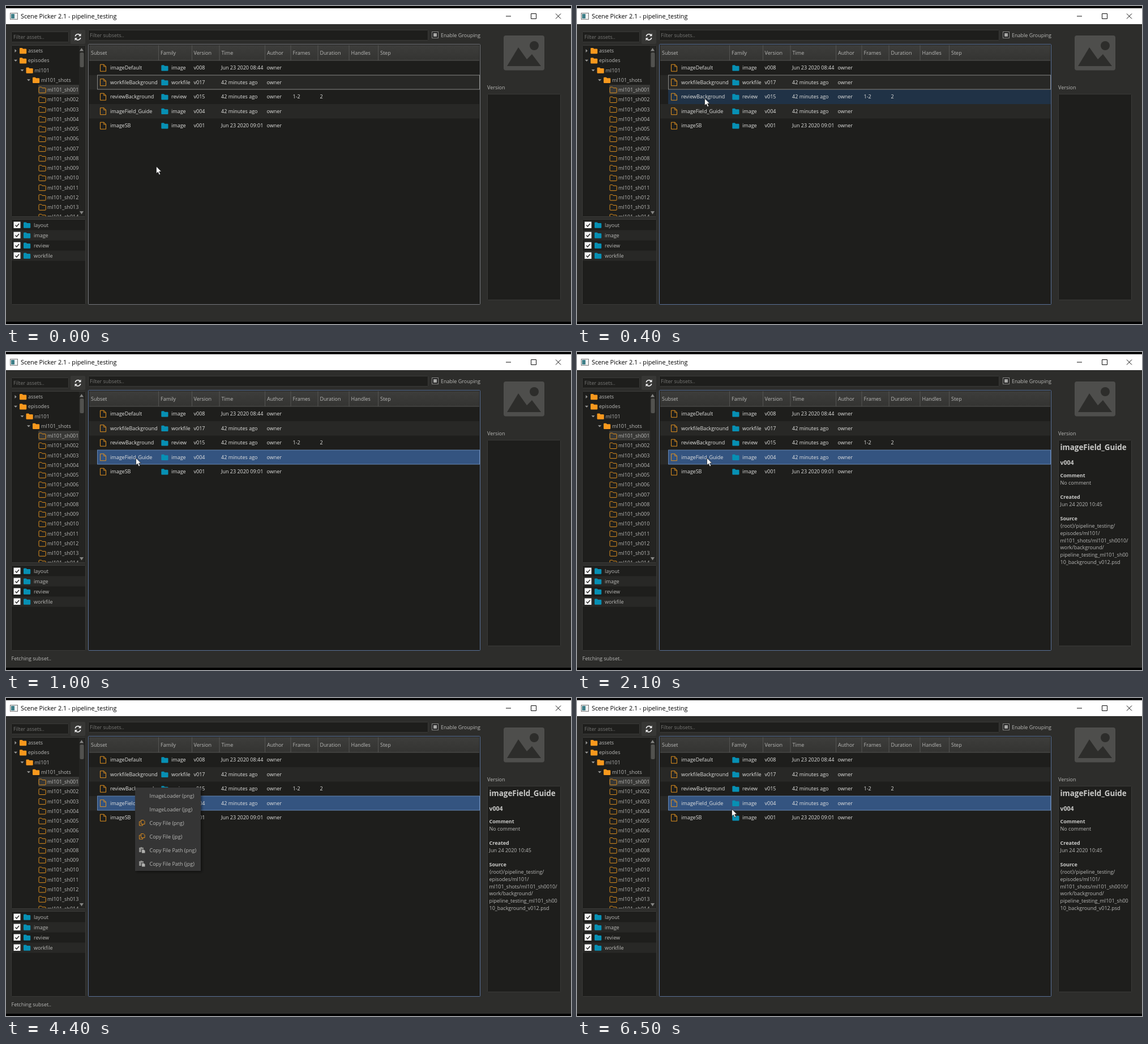
Write an HTML page that moves like this. It is 998 by 561 pixels and loops after 6800 ms.

```html
<!DOCTYPE html>
<html lang="en">
<head>
<meta charset="utf-8">
<title>Scene Picker</title>
<style>
  html, body { margin: 0; width: 100%; height: 100%; overflow: hidden; background: #000; }
  svg { display: block; width: 998px; height: 561px; }
  text { font: 9px "Open Sans", "Noto Sans", sans-serif; fill: #b9b9b7; white-space: pre; }
  .title { font-size: 10.8px; fill: #000; }
  .bright { fill: #e2e2e0; }
  .hint { fill: #777775; }
  .dark { fill: #1c1f22; }
  .bold { font-weight: 700; fill: #cbcbc9; }
  .panel { fill: #1e1e1c; stroke: #3a3a38; }
</style>
</head>
<body>
<svg id="stage" viewBox="0 0 998 561">
  <defs>
    <linearGradient id="head" x2="0" y2="1">
      <stop stop-color="#3d3d3b"/><stop offset="1" stop-color="#343432"/>
    </linearGradient>
    <filter id="shadow"><feDropShadow dx="2" dy="2" stdDeviation="2" flood-opacity=".5"/></filter>
    <clipPath id="treeClip"><rect x="10" y="69" width="119" height="302"/></clipPath>
    <path id="folder" d="M0 1.2Q0 0 1.2 0H4.6L6 1.6H11Q12.2 1.6 12.2 2.8V9Q12.2 10.2 11 10.2H1.2Q0 10.2 0 9Z"/>
    <path id="file" d="M.5.5H7L10.5 4V12.5H.5ZM6.8.7V4.2H10.3" fill="none" stroke="#e0901f"/>
    <g id="copy" fill="none" stroke="#d98a1e"><path d="M3.5 2.5V.5H8L10 2.5V7.5H3.5V2.5"/><path d="M3.5 3H.5V10H6.5V7.5"/></g>
    <g id="paste"><path d="M0 1H2.5V0H5.5V1H8V3.5H4V9H0Z" fill="#8f8f8d"/><path d="M5 4.5H8.5L10.5 6.5V10.5H5Z" fill="#b0b0ae"/></g>
  </defs>
  <g id="base"></g>
  <g id="rowMarks">
    <rect id="hover" x="161" width="675.5" height="25.5" fill="#203246"/>
    <rect id="current" x="161.5" y="122" width="675" height="25" fill="none" stroke="#858583"/>
    <rect id="selected" x="161.5" y="173" width="675" height="25" fill="#345480" stroke="#6585b2"/>
  </g>
  <g id="content"></g>
  <text id="status" x="9.5" y="543.7">Fetching subset..</text>
  <g id="details"></g>
  <g id="menu"></g>
  <path id="cursor" d="M0 0V12.6L2.9 9.9 5 14.8 7.2 13.8 5.1 9.1H9Z" fill="#fff" stroke="#111" stroke-width=".7"/>
</svg>
<script>
const $ = id => document.getElementById(id);
const text = (x, y, s, cls = "", size = "") =>
  `<text x="${x}" y="${y + 3.2}" class="${cls}" ${size && `style="font-size:${size}px"`}>${s}</text>`;
const rect = (x, y, w, h, attrs) => `<rect x="${x}" y="${y}" width="${w}" height="${h}" ${attrs}/>`;
const panel = (x, y, w, h) => rect(x + .5, y + .5, w - 1, h - 1, 'class="panel" rx="1"');
const path = (d, attrs) => `<path d="${d}" ${attrs}/>`;
const use = (id, x, y, attrs = "") => `<use href="#${id}" x="${x}" y="${y}" ${attrs}/>`;
const BLUE = 'fill="#0790b4"', ORANGE = 'fill="#f8981d"';
const OPEN = 'fill="none" stroke="#e0901f"';
const ROW_TOP = 96.5, ROW_H = 25.5;

function windowFrame() {
  return rect(0, 4, 998, 553, 'fill="#2d2d2b"') + rect(0, 4, 998, 28, 'fill="#fff"') +
    rect(7.5, 12.5, 13, 11, 'fill="#f2f2f2" stroke="#777"') + rect(9, 14, 6, 8, 'fill="#3f7f88"') +
    text(26, 18.4, "Scene Picker", "title") + text(92, 18.4, "2.1 - pipeline_testing", "title") +
    path("M883 18H892M927.5 13.5H936.5V22.5H927.5ZM971 13.5L980 22.5M980 13.5L971 22.5", 'fill="none" stroke="#111"');
}

function filters() {
  return panel(9, 45, 102, 19) + text(13, 55, "Filter assets..", "hint") +
    rect(114, 42, 26, 25, 'rx="2" fill="#373735"') +
    path("M122.3 53.5A5 5 0 0 1 131 51.4M131.7 56A5 5 0 0 1 123 58.1", 'fill="none" stroke="#f0f0f0" stroke-width="1.7"') +
    path("M132.5 48.5V53.2H127.8ZM121.5 61V56.3H126.2Z", 'fill="#f0f0f0"') +
    panel(145, 42, 601, 19) + text(148, 52, "Filter subsets..", "hint") +
    rect(752.5, 45.5, 11, 11, 'fill="#222" stroke="#858583"') + rect(755, 48, 6, 6, 'fill="#a8a8a6"') +
    text(768, 51.3, "Enable Grouping");
}

function tree() {
  const parents = ["assets", "episodes", "ml101", "ml101_shots"].map((name, i) => {
    const x = 17 + Math.max(0, i - 1) * 11.5, y = 79 + i * 17.25;
    const arrow = i ? `M${x - 3} ${y - 1.5}h6l-3 3.2z` : `M${x - 1.5} ${y - 3}v6l3.2-3z`;
    return path(arrow, 'fill="#999997"') + use("folder", x + 7, y - 5, ORANGE) + text(x + 22, y, name);
  });
  const shots = Array.from({ length: 14 }, (_, i) => {
    const y = 148 + i * 17.25;
    return use("folder", 58, y - 5, OPEN) + text(73, y, "ml101_sh" + String(i + 1).padStart(3, "0"));
  });
  return panel(9, 69, 132, 303) +
    `<g clip-path="url(#treeClip)">${rect(57, 139, 72, 17, 'fill="#383836"')}${parents.join("")}${shots.join("")}</g>` +
    rect(129, 70, 10, 301, 'fill="#242422"') + rect(130.5, 82, 7, 26, 'rx="2" fill="#52524f"') +
    path("M130 79.5H137L133.5 74ZM130 362H137L133.5 367.5Z", 'fill="#858583"');
}

function families() {
  return panel(9, 376, 132, 151) + ["layout", "image", "review", "workfile"].map((name, i) => {
    const y = 386.5 + i * 18;
    return (i % 2 ? rect(10, y - 9, 130, 18, 'fill="#282826"') : "") +
      rect(13.5, y - 6, 12, 11.5, 'fill="#f4f4f4"') +
      path(`M16.5 ${y}l2.3 2.5 4.2-5`, 'fill="none" stroke="#222" stroke-width="1.3"') +
      use("folder", 31, y - 5, BLUE) + text(49, y, name);
  }).join("");
}

function tableBase() {
  const heads = { Subset: 150, Family: 273, Version: 331.5, Time: 380.5, Author: 461, Frames: 506.5, Duration: 554.5, Handles: 609.5, Step: 661 };
  const splits = [269.5, 328.5, 377, 457.5, 503, 551, 606, 657.5].map(x => `M${x} 69V96`).join("");
  return rect(145.5, 67.5, 692, 459, 'id="table" rx="1" fill="#1e1e1c"') +
    rect(147, 69, 689, 27, 'fill="url(#head)"') + path(splits + "M147 96H836", 'stroke="#545452"') +
    Object.entries(heads).map(([name, x]) => text(x, 82.5, name)).join("") +
    [1, 3].map(i => rect(147, ROW_TOP + i * ROW_H, 689, ROW_H, 'fill="#282826"')).join("");
}

function tableRows() {
  const ago = "42 minutes ago";
  return [
    ["imageDefault", "image", "v008", "Jun 23 2020 08:44"],
    ["workfileBackground", "workfile", "v017", ago],
    ["reviewBackground", "review", "v015", ago, "1-2", "2"],
    ["imageField_Guide", "image", "v004", ago],
    ["imageSB", "image", "v001", "Jun 23 2020 09:01"]
  ].map(([name, family, version, time, frames = "", duration = ""], i) => {
    const y = 109.2 + i * ROW_H;
    const cells = [[184, name], [292, family], [331.5, version], [380, time], [460.5, "owner"], [506.5, frames], [554.5, duration]];
    return use("file", 166, y - 6.5) + use("folder", 274.3, y - 5, BLUE) +
      cells.map(([x, s]) => text(x, y, s, "bright")).join("");
  }).join("");
}

function versionPane() {
  return rect(879, 52, 72, 61.5, 'rx="4" fill="#4e4e4c"') +
    `<circle cx="933" cy="70" r="8" fill="#2d2d2b"/>` +
    path("M885 106L905 73L920 94L929 85L945 106Z", 'fill="#2d2d2b"') +
    text(850, 144, "Version") + panel(850, 155, 130, 364);
}

function details() {
  const lines = ["{root}/pipeline_testing/", "episodes/ml101/", "ml101_shots/ml101_sh0010/", "work/background/", "pipeline_testing_ml101_sh00", "10_background_v012.psd"];
  return text(853.5, 169.8, "imageField_Guide", "bold", 13.4) + text(853.5, 195.7, "v004", "bold", 10.5) +
    text(853.5, 217.5, "Comment", "bold") + text(853.5, 230.3, "No comment") +
    text(853.5, 255.8, "Created", "bold") + text(853.5, 268.5, "Jun 24 2020 10:45") +
    text(853.5, 294, "Source", "bold") +
    lines.map((s, i) => text(853.5, 307 + i * 12.7, s)).join("");
}

function menu() {
  const items = ["ImageLoader", "Copy File", "Copy File Path"].flatMap(s => [s + " (png)", s + " (jpg)"]);
  return rect(228, 158, 116, 147, 'fill="#363634" filter="url(#shadow)"') +
    items.map((s, i) => {
      const y = 172.5 + i * 24;
      return (i < 2 ? "" : use(i < 4 ? "copy" : "paste", 235, y - 5.5)) + text(253.5, y, s);
    }).join("") +
    `<g id="menuHover">${rect(234, 184, 107, 24, 'fill="#30475f"')}${text(253.5, 196.5, items[1], "dark")}</g>`;
}

$("base").innerHTML = windowFrame() + filters() + tree() + families() + tableBase();
$("content").innerHTML = tableRows() + versionPane();
$("details").innerHTML = details();
$("menu").innerHTML = menu();

const clamp = v => Math.min(1, Math.max(0, v));
const ease = v => v * v * (3 - 2 * v);
const mix = (a, b, p) => a + (b - a) * p;
const show = (id, on) => $(id).setAttribute("visibility", on ? "visible" : "hidden");

function pointer(t) {
  if (t >= 6500) return [273.5, 196];
  const reach = ease(clamp(t / 400)), nudge = clamp((t - 500) / 300);
  return [mix(mix(265.5, 225.5, reach), 229.5, nudge), mix(mix(283, 163, reach), 187, nudge)];
}

function render(now) {
  const t = Math.floor(now % 6800 / 100) * 100;
  const [x, y] = pointer(t);
  const row = Math.floor((y - ROW_TOP) / ROW_H);
  const clicked = t >= 1000;

  $("cursor").setAttribute("transform", `translate(${x} ${y})`);
  show("cursor", t < 3200 || t >= 6500);
  $("hover").setAttribute("y", ROW_TOP + row * ROW_H);
  show("hover", !clicked && row < 5);
  show("current", !clicked);
  show("selected", clicked);
  $("table").setAttribute("stroke", t < 100 ? "#74767b" : "#5a7196");
  show("status", clicked && t < 6000);
  show("details", t >= 2100);
  $("menu").setAttribute("opacity", t < 6000 ? clamp((t - 4100) / 300) : 0);
  show("menuHover", t >= 5100);
  requestAnimationFrame(() => render(performance.now() - start));
}
const start = performance.now();
render(0);
</script>
</body>
</html>
```
